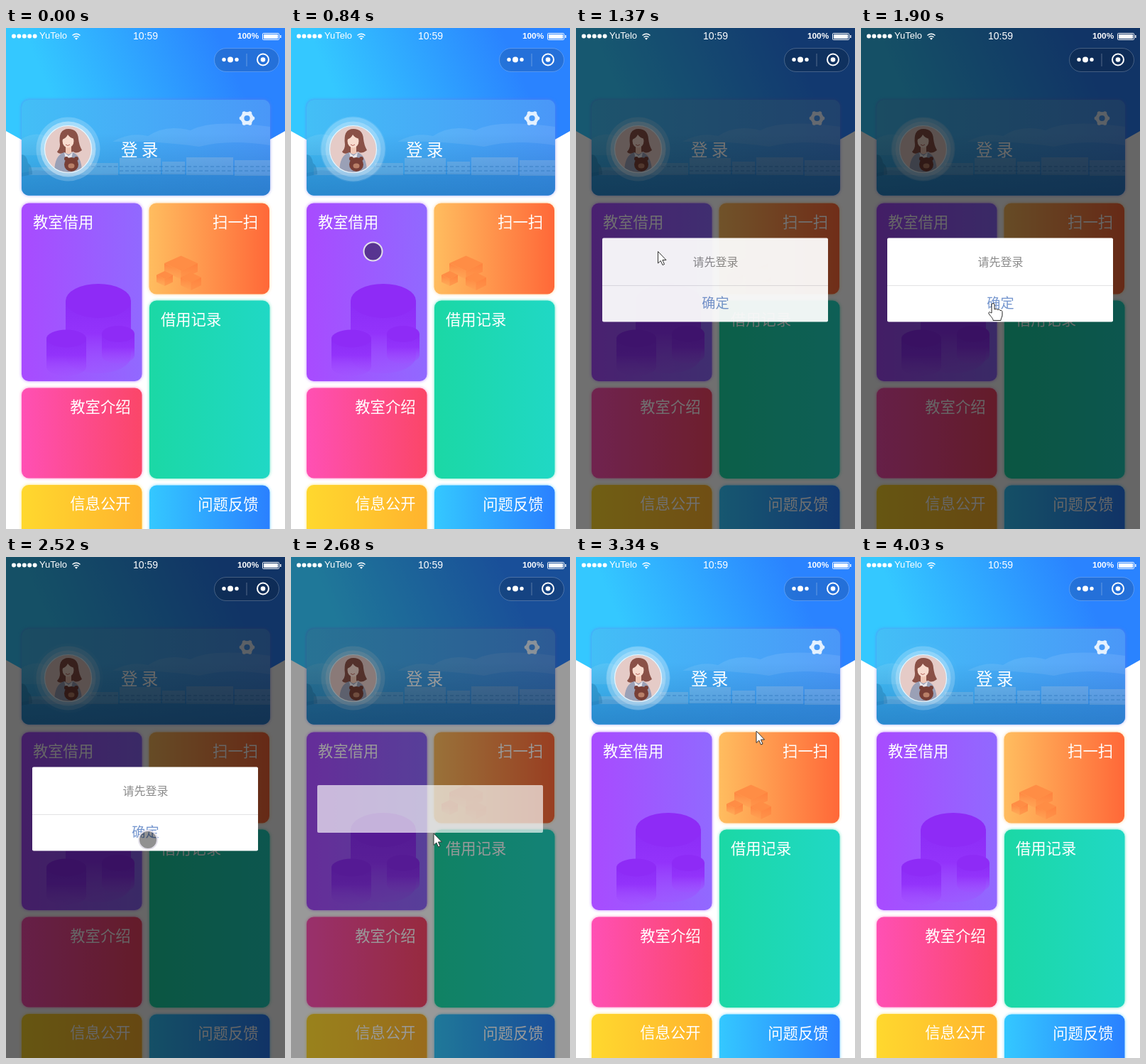
Recreate the animation shown at these times as an HTML page. Size 393 by 705 pixels, loop 4110 ms.

```html
<!DOCTYPE html>
<html lang="zh">
<head>
<meta charset="utf-8">
<style>
html, body { margin: 0; width: 100%; height: 100%; overflow: hidden; background: #fff; }
svg { display: block; width: 100vw; height: 100vh; }
text { font-family: "Noto Sans CJK SC", "Noto Sans CJK", sans-serif; fill: #fff; }
.bar text { font-family: "Liberation Sans", Arial, sans-serif; }
.label { font-size: 21.3px; }
</style>
</head>
<body>
<svg viewBox="0 0 393 705" preserveAspectRatio="none">
  <defs>
    <linearGradient id="head" gradientUnits="userSpaceOnUse" x1="70" y1="110" x2="300" y2="10">
      <stop stop-color="#34c8ff"/><stop offset="1" stop-color="#2a83ff"/>
    </linearGradient>
    <linearGradient id="sky"><stop stop-color="#43bff6"/><stop offset="1" stop-color="#4a97f8"/></linearGradient>
    <linearGradient id="shade" x2="0" y2="1">
      <stop offset=".35" stop-color="#1b6cb4" stop-opacity="0"/><stop offset="1" stop-color="#1b6cb4" stop-opacity=".5"/>
    </linearGradient>
    <linearGradient id="drum" x2="0" y2="1">
      <stop stop-color="#8c2cf6"/><stop offset=".45" stop-color="#9333fb"/><stop offset="1" stop-color="#a150ff" stop-opacity=".25"/>
    </linearGradient>
    <linearGradient id="block" x2="0" y2="1">
      <stop stop-color="#ff8540"/><stop offset="1" stop-color="#ff9a50" stop-opacity=".35"/>
    </linearGradient>
    <clipPath id="cardClip"><rect x="22" y="101" width="350" height="134.5" rx="10"/></clipPath>
    <clipPath id="faceClip"><circle cx="87.5" cy="170.5" r="32.5"/></clipPath>
  </defs>

  <rect width="393" height="705" fill="#fff"/>
  <path d="M0 0H393V145Q196 262 0 145Z" fill="url(#head)"/>

  <rect x="22" y="101" width="350" height="134.5" rx="10" fill="#4a97f8" style="filter:drop-shadow(0 0 2px #6a78e8aa)"/>
  <g clip-path="url(#cardClip)">
    <rect x="22" y="101" width="350" height="135" fill="url(#sky)"/>
    <g fill="#fff" opacity=".09">
      <path d="M150 160q25-14 50-8 25-17 60-8 30-16 112-5v26q-60-9-100 2-60-9-122-7z"/>
      <path d="M22 156q22-13 42 0 20 12 60 15v8H22z"/>
    </g>
    <path d="M22 204l20-4 70 6 110-2 150 3v29H22z" fill="#2a86cf" opacity=".4"/>
    <g fill="#c9d3e0" opacity=".32">
      <path d="M118 190h40v17h-40zM160 183h58v23h-58zM220 188h32v18h-32zM254 182h66v25h-66zM322 186h50v22h-50zM32 196h86v11H32z"/>
    </g>
    <path d="M120 195H372M160 201H372" stroke="#2f78bd" stroke-width="2" stroke-dasharray="5 3" opacity=".35"/>
    <path d="M22 178q7 0 9 12 6 4 6 16l-15 3z" fill="#287fae" opacity=".45"/>
    <rect x="22" y="101" width="350" height="135" fill="url(#shade)"/>
  </g>

  <g fill="#fff">
    <circle id="ripple" cx="87.5" cy="170.5" r="45"/>
    <circle cx="87.5" cy="170.5" r="45" opacity=".2"/>
    <circle cx="87.5" cy="170.5" r="39" opacity=".24"/>
  </g>
  <g clip-path="url(#faceClip)">
    <rect x="54" y="137" width="67" height="67" fill="#e5cbc7"/>
    <path d="M76 164q-3-22 12-22 13 0 14 14 1 9 5 16-8 6-12 2l-14 2q-7 2-9-2 4-4 4-10z" fill="#8a5147"/>
    <path d="M84 166h8v11h-8z" fill="#f0c6b4"/>
    <ellipse cx="87.5" cy="159" rx="8" ry="9.5" fill="#f8dccf"/>
    <path d="M79 157q2-10 9-11 8 1 9 10-7-1-10-6-2 5-8 7z" fill="#8a5147"/>
    <path d="M84 164q3 3 6 0" fill="none" stroke="#b4615a"/>
    <path d="M68 204q0-25 14-29l6 3 6-3q13 5 13 29z" fill="#9aa0b6"/>
    <path d="M82 175l6 5 6-5-2 9h-8z" fill="#e9e6ea"/>
    <circle cx="92" cy="192" r="10" fill="#783f36"/>
    <circle cx="85" cy="184" r="3" fill="#783f36"/><circle cx="99" cy="184" r="3" fill="#783f36"/>
    <ellipse cx="92" cy="194" rx="4.5" ry="3.5" fill="#b98068"/>
  </g>
  <circle cx="87.5" cy="170.5" r="33" fill="none" stroke="#fff" stroke-opacity=".8" stroke-width="1.2"/>
  <text x="162" y="180" font-size="23.5">登 录</text>
  <g id="gear" transform="translate(339.5 127)" fill="#e4f1ff">
    <circle r="6.6" fill="none" stroke="#e4f1ff" stroke-width="5"/>
  </g>

  <g id="tiles"></g>
  <g id="art"></g>
  <g id="labels" class="label"></g>

  <rect id="mask" width="393" height="705"/>
  <g id="modal">
    <rect id="panel" x="37" width="318" rx="2" fill="#fff"/>
    <g id="words" text-anchor="middle">
      <path d="M37 362.5H355" stroke="#e2e2e4"/>
      <text x="196.5" y="335" font-size="16" style="fill:#8b8b8b">请先登录</text>
      <text x="196.5" y="394" font-size="19.2" style="fill:#7596ce">确定</text>
    </g>
  </g>

  <g class="bar" fill="#fff">
    <g id="dots"></g>
    <text x="47" y="15" font-size="13">YuTelo</text>
    <g fill="none" stroke="#fff" stroke-width="1.4">
      <path d="M93.5 10.5q5.500-4.500 11 0M95.500 13q3.500-3 7 0"/>
    </g>
    <path d="M97 14.600q2-1.500 4 0l-2 2.200z"/>
    <text x="196.500" y="16" font-size="14" text-anchor="middle">10:59</text>
    <text x="326" y="15" font-size="11.800" font-weight="bold">100%</text>
    <rect x="361.500" y="7.500" width="23" height="9" rx="1" fill="none" stroke="#fff"/>
    <path d="M363 9H383V15H363ZM386 10h1.500v4H386z"/>
    <rect x="293.500" y="28.500" width="91" height="33" rx="16.500" fill="#000" fill-opacity=".15" stroke="#fff" stroke-opacity=".22"/>
    <circle cx="307" cy="44.500" r="2.700"/><circle cx="316" cy="44.500" r="4"/><circle cx="325" cy="44.500" r="2.700"/>
    <path d="M339 36V54" stroke="#fff" stroke-opacity=".3"/>
    <circle cx="362" cy="44.500" r="8" fill="none" stroke="#fff" stroke-width="2"/><circle cx="362" cy="44.500" r="3.300"/>
  </g>

  <g id="cursor" stroke-linejoin="round">
    <path id="arrow" d="M0 0V16.500L3.800 13 6.500 19 9 18 6.400 12H11.500Z" fill="#fff" stroke="#333"/>
    <path id="hand" d="M-2 13V1.500a2 2 0 0 1 4 0V8c1-1 3.500-1 4 .5 1-1 3.500-.5 4 1 1.500-.5 3 .3 3 2V16c0 3-2 4-2 7.500H0c0-3-2-4-6-9.500-.8-2 1-3 2.500-1.500z" fill="#fff" stroke="#222"/>
    <circle id="touch" r="13" fill="#000" fill-opacity=".43" stroke="#e3e0ea" stroke-width="2"/>
  </g>
</svg>
<script>
const LOOP = 4110;
const $ = id => document.getElementById(id);

function add(parent, tag, attrs, text) {
  const el = document.createElementNS("http://www.w3.org/2000/svg", tag);
  for (const k in attrs) el.setAttribute(k, attrs[k]);
  if (text) el.textContent = text;
  return $(parent).appendChild(el);
}

// x, y, height, colours, label, label baseline, right aligned
const tiles = [
  [22, 246.5, 250.5, "#a84bff", "#9169ff", "教室借用", 281, 0],
  [201.5, 246.5, 128, "#ffbd5f", "#ff6838", "扫一扫", 281, 1],
  [202, 383.5, 250.5, "#1bd8a5", "#20d8c5", "借用记录", 418, 0],
  [22, 506.5, 127, "#ff50b4", "#fb4668", "教室介绍", 541, 1],
  [22, 643, 127, "#ffd82e", "#ffb32e", "信息公开", 677, 1],
  [202, 643.5, 127, "#34c8ff", "#2a80ff", "问题反馈", 678, 1]
];
tiles.forEach(([x, y, h, c1, c2, label, base, right], i) => {
  const grad = add("tiles", "linearGradient", { id: "tile" + i });
  grad.innerHTML = `<stop stop-color="${c1}"/><stop offset="1" stop-color="${c2}"/>`;
  add("tiles", "rect", { x, y, width: 169.5, height: h, rx: 10, fill: `url(#tile${i})`,
    style: `filter:drop-shadow(0 0 2px ${c1}aa)` });
  add("labels", "text", { x: x + (right ? 153.5 : 16), y: base, "text-anchor": right ? "end" : "start" }, label);
});

function drum(x, y, rx, ry, h) {
  add("art", "path", { d: `M${x - rx} ${y}v${h}a${rx} ${ry} 0 0 0 ${2 * rx} 0v${-h}z`, fill: "url(#drum)" });
  add("art", "ellipse", { cx: x, cy: y, rx, ry, fill: "#8e2bf6" });
}
drum(130, 384, 46, 24, 78);
drum(85, 437, 28, 12.5, 40);
drum(158, 430.5, 23, 11.5, 30);

function block(x, y, w, d, h) {
  add("art", "path", { d: `M${x - w} ${y}v${h}l${w} ${d} ${w} ${-d}v${-h}l${-w} ${d}z`, fill: "url(#block)" });
  add("art", "path", { d: `M${x} ${y - d}l${w} ${d} ${-w} ${d} ${-w} ${-d}z`, fill: "#ff8d45" });
  add("art", "path", { d: `M${x} ${y + d}l${w} ${-d}v${h}l${-w} ${d}z`, fill: "#ff7d3c", opacity: .35 });
}
block(246.500, 331, 23.500, 10.500, 12);
block(223.500, 347.500, 11.500, 5.500, 10);
block(260.500, 351, 14.500, 7, 11);

for (let i = 0; i < 5; i++) add("dots", "circle", { cx: 11 + i * 7.4, cy: 11.5, r: 3 });
for (let i = 0; i < 6; i++) {
  const a = i * Math.PI / 3;
  add("gear", "circle", { cx: 8 * Math.cos(a), cy: 8 * Math.sin(a), r: 2.8 });
}

// time, x, y
const path = [
  [210, 275, 706], [290, 255, 631], [590, 115.5, 314.5], [1640, 115.5, 314.5],
  [1900, 186, 388], [2060, 200, 398], [2610, 200, 398], [2680, 201, 389],
  [2820, 210.5, 251.5], [2970, 254, 245], [3400, 254, 245], [3800, 396, 708]
];
const clamp = v => Math.max(0, Math.min(1, v));
const ramp = (t, a, b) => clamp((t - a) / (b - a));
const within = (t, a, b) => t >= a && t < b;
const show = (id, on) => $(id).setAttribute("visibility", on ? "visible" : "hidden");

function position(t) {
  let i = 0;
  while (i < path.length - 2 && t >= path[i + 1][0]) i++;
  const [a, ax, ay] = path[i], [b, bx, by] = path[i + 1];
  const p = ramp(t, a, b), e = p * p * (3 - 2 * p);
  return [ax + (bx - ax) * e, ay + (by - ay) * e];
}

function draw(t) {
  const p = ramp(t, 1160, 1386) * (1 - ramp(t, 2605, 2831));
  const closing = t >= 2605;
  $("mask").setAttribute("opacity", .6 * p);
  $("modal").setAttribute("opacity", p);
  $("panel").setAttribute("y", closing ? 321 : 295.5);
  $("panel").setAttribute("height", closing ? 67 : 118);
  $("words").setAttribute("opacity", closing ? 0 : 1);

  const wave = t / (LOOP / 3) % 1;
  $("ripple").setAttribute("r", 39 + 12 * wave);
  $("ripple").setAttribute("opacity", .22 * (1 - wave));

  const [x, y] = position(t);
  const live = within(t, 210, 3800);
  const pressed = within(t, 760, 1060) || within(t, 2280, 2560);
  const over = within(t, 1640, 2605) && y > 362;
  $("cursor").setAttribute("transform", `translate(${x} ${y})`);
  show("touch", live && pressed);
  show("hand", live && over && !pressed);
  show("arrow", live && !over && !pressed);
}

const start = performance.now();
function tick() {
  draw((performance.now() - start) % LOOP);
  requestAnimationFrame(tick);
}
tick();
</script>
</body>
</html>
```
